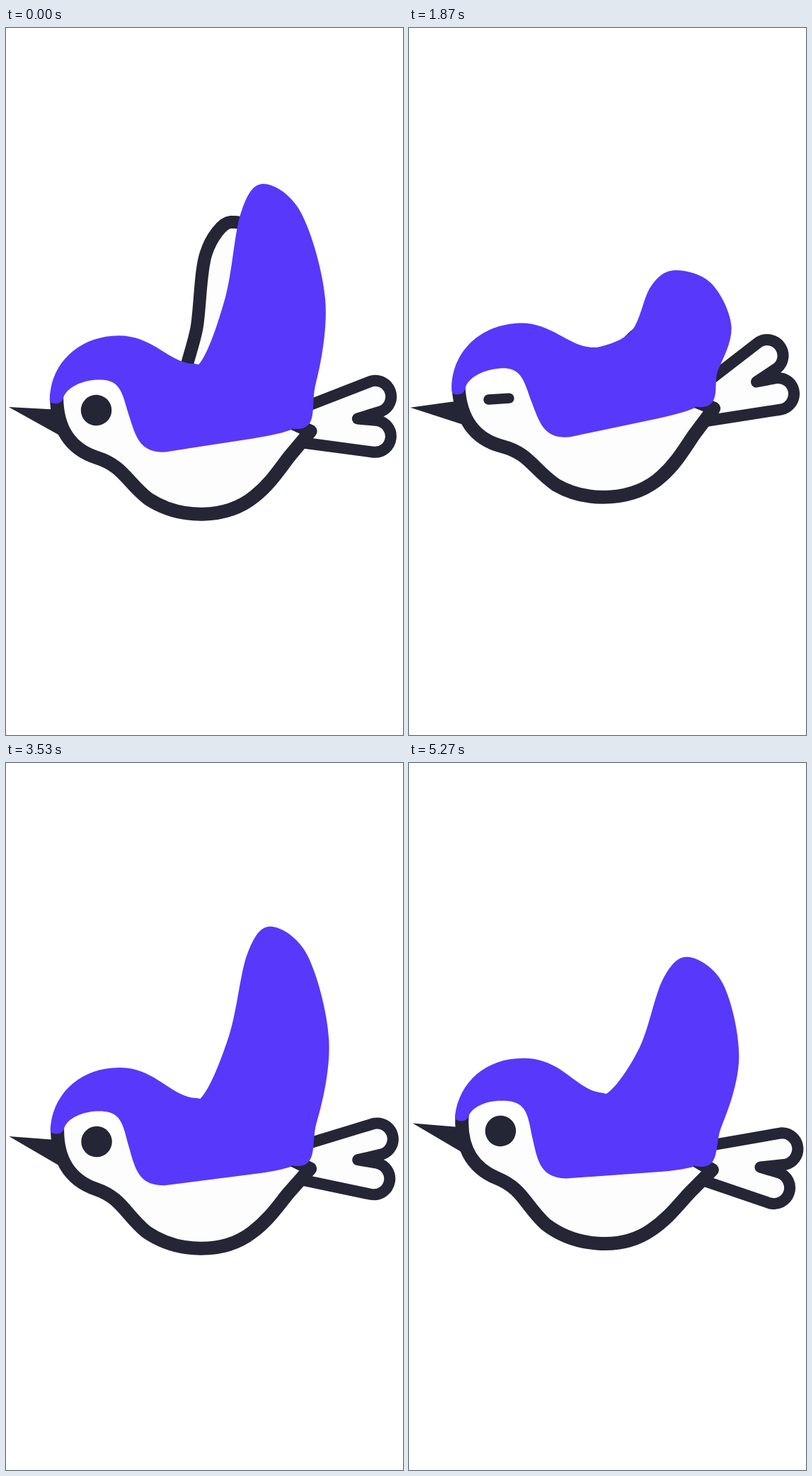
An HTML page for the animation above (5310 ms loop, 561 by 998 pixels).

```html
<!DOCTYPE html>
<html lang="en">
<head>
<meta charset="utf-8">
<title>Flying bird</title>
<style>
  html, body { margin: 0; width: 100%; height: 100%; overflow: hidden; background: #fff; }
  svg { display: block; width: 100%; height: 100%; }
  .outline { fill: #fdfdfd; stroke: #242535; stroke-linejoin: round; stroke-linecap: round; }
  .dark { fill: #242535; }
  .blue { fill: #5838fa; }
</style>
</head>
<body>
<svg viewBox="0 0 561 998">
  <g id="bird">
    <path id="farWing" class="outline" stroke-width="18"/>
    <path id="tail" class="outline" stroke-width="16"
      d="M408 542 L517.3 501.9 A22.5 22.5 0 0 1 531 544.6 L497 554.5 L525 557.7 A22.5 22.5 0 0 1 518.5 602.2 L412 586"/>
    <path id="beak" class="dark" d="M4 532 L64 536 L84 545 L76 573 Z"/>
    <path class="outline" stroke-width="19" stroke-linecap="butt"
      d="M72 520 C72 560 88 592 128 605 C165 617 170 640 200 664 C245 694 310 694 350 662 C372 645 385 625 400 606 L430 571 L405 559"/>
    <path class="blue"
      d="M62 522 C64 470 105 433 160 433 C210 433 232 474 268 474 C310 480 350 510 404 568 Q390 574 350 580 L225 598
         C185 600 182 570 172 540 C164 510 160 495 132 495 C105 495 83 508 81 522 Q78 528 70 528 Q62 528 62 522 Z"/>
    <path id="wing" class="blue"/>
    <rect id="eye" class="dark" x="106" width="43.5"/>
  </g>
</svg>
<script>
const LOOP = 5310, BEAT = 591.7, HINGE = 530;
const $ = id => document.getElementById(id);
const clamp = v => Math.min(1, Math.max(0, v));
const ramp = (p, from, to) => clamp((p - from) / (to - from));
const angleAt = p => 2 * Math.PI * p / BEAT;

// Raised wings; flapping squashes them towards the hinge.
const wing = [[312, 380], [335, 262], [367, 221], [420, 262], [453, 385], [438, 505]];
const farWing = [[255, 510], [271, 418], [284, 315], [319, 270], [350, 310], [330, 520]];
const shoulder = [[200, 470], [235, 470], [274, 474]];
const rump = [[404, 567]];

const flap = (points, raise, lean) => points.map(([x, y]) =>
  [x + (HINGE - y) * lean * (1 - raise), HINGE + (y - HINGE) * raise]);

// Cosine of the wing angle; the downstroke is a little quicker.
function wingRaise(p) {
  const a = angleAt(p - 4);
  return Math.cos(a + 0.14 * (1 - Math.cos(a)));
}

// Closed smooth curve through the points.
function smooth(points) {
  const n = points.length, at = i => points[(i + n) % n];
  const handle = (i, dir) => at(i).map((v, k) => v + dir * (at(i + 1)[k] - at(i - 1)[k]) / 6);
  return points.reduce((d, _, i) => d + `C${handle(i, 1)} ${handle(i + 1, -1)} ${at(i + 1)}`, `M${at(0)}`) + "Z";
}

function draw(t) {
  const beat = Math.round(t / BEAT), p = t - beat * BEAT;

  const lift = -50 * (1 - Math.cos(angleAt(p)));
  const tilt = 5.3 - 9.1 * Math.cos(angleAt(p - 82));
  $("bird").setAttribute("transform", `translate(0 ${lift}) rotate(${tilt} 272 555)`);

  const tailAngle = -20 * Math.sin(angleAt(p + 4)) - tilt;
  $("tail").setAttribute("transform", `rotate(${tailAngle} 424 564)`);
  $("beak").setAttribute("transform", `rotate(${-11 * Math.sin(angleAt(p)) ** 2} 75 550)`);

  $("wing").setAttribute("d", smooth([...shoulder, ...flap(wing, wingRaise(p), 0.13), ...rump]));

  // The far wing trails slightly and rises fully on every fourth beat.
  const farRaise = Math.max(0, wingRaise(p - 15)) * (beat % 4 ? 0.5 : 1);
  $("farWing").setAttribute("d", smooth(flap(farWing, farRaise, 0.3)));

  // Blinks come in pairs of beats.
  const blinks = (beat + 1) % 4 < 2;
  const open = blinks ? 1 - ramp(p, 5, 30) + ramp(p, 94, 106) : 1;
  const h = 9 + 34.5 * open;
  $("eye").setAttribute("y", 538 - h / 2);
  $("eye").setAttribute("height", h);
  $("eye").setAttribute("rx", h / 2);
}

const start = performance.now();
function tick() {
  draw((performance.now() - start) % LOOP);
  requestAnimationFrame(tick);
}
tick();
</script>
</body>
</html>
```
